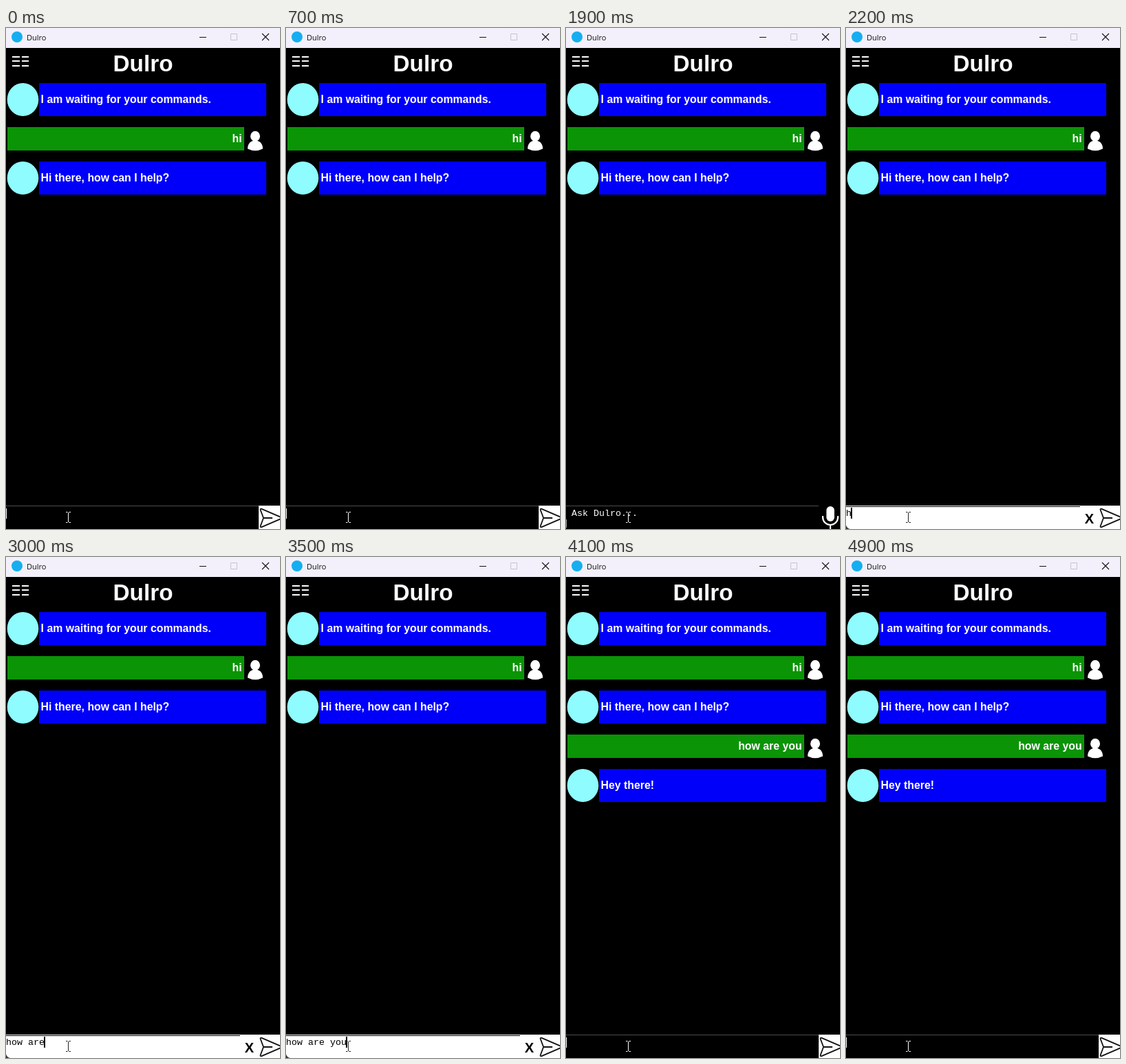
An HTML page with a canvas for the animation above (5 s loop, 398 by 728 pixels).

```html
<!DOCTYPE html>
<html lang="en">
<head>
<meta charset="utf-8">
<title>Dulro</title>
<style>
  html, body { margin: 0; width: 100%; height: 100%; overflow: hidden; background: #000; }
  canvas { display: block; width: 398px; height: 728px; }
</style>
</head>
<body>
<canvas id="stage" width="398" height="728"></canvas>
<script>
const ctx = document.getElementById('stage').getContext('2d');
const NAME = 'Dulro';
const LOOP = 5000, IDLE = 1500, TYPE = 2200, KEY = 125, SEND = 4100;
const QUERY = 'how are you';
const SANS = '"Liberation Sans", Arial, sans-serif';
const BOLD = `bold 15.85px ${SANS}`;
const MONO = '13.333px "Liberation Mono", "Courier New", monospace';

function rect(x, y, w, h, color) {
  ctx.fillStyle = color;
  ctx.fillRect(x, y, w, h);
}

function ellipse(x, y, rx, ry, color) {
  ctx.fillStyle = color;
  ctx.beginPath();
  ctx.ellipse(x, y, rx, ry, 0, 0, Math.PI * 2);
  ctx.fill();
}

function text(str, x, y, font, color, align = 'left') {
  ctx.font = font;
  ctx.fillStyle = color;
  ctx.textAlign = align;
  ctx.fillText(str, x, y);
}

function fill(d, color) {
  ctx.fillStyle = color;
  ctx.fill(new Path2D(d));
}

function stroke(d, color, width) {
  ctx.strokeStyle = color;
  ctx.lineWidth = width;
  ctx.stroke(new Path2D(d));
}

function titleBar() {
  rect(0, 0, 398, 29, '#f3f0fb');
  ellipse(16, 13, 8, 8, '#16aef0');
  text(NAME, 30, 18, '11px "Open Sans", "Noto Sans", sans-serif', '#111');
  stroke('M281 13.5H291', '#111', 1);
  stroke('M326.5 8.5H335.5V17.5H326.5Z', '#c6c3cc', 1);
  stroke('M372 8L382 18M382 8L372 18', '#111', 1.1);
}

function header() {
  for (const y of [42, 48, 55]) stroke(`M9 ${y}H20M23 ${y}H33`, '#fff', 2);
  text(NAME, 199, 63, `bold 33.333px ${SANS}`, '#fff', 'center');
}

function botMessage(str, y) {
  ellipse(24.5, y + 24, 22.8, 24, '#8ffcff');
  rect(48, y, 330, 48, '#0000fa');
  text(str, 50.6, y + 29, BOLD, '#fff');
}

function userMessage(str, y) {
  rect(2, y, 344, 34, '#0a9406');
  text(str, 342.6, y + 22, BOLD, '#fff', 'right');
  ellipse(362, y + 13.3, 7, 7.5, '#fff');
  fill(`M351 ${y + 31.5}C351 ${y + 25} 354 ${y + 21.5} 358.5 ${y + 20}H365.5
    C370 ${y + 21.5} 373 ${y + 25} 373 ${y + 31.5}Q362 ${y + 37} 351 ${y + 31.5}Z`, '#fff');
}

function sendButton() {
  rect(367, 694, 31, 34, '#fff');
  ctx.lineJoin = 'round';
  stroke(`M371.5 698.8L397 709.8Q401 712 397 714.2L371.5 725.2Q369 726 369.7 723.5
    L374 712L369.7 700.5Q369 698 371.5 698.8ZM374 712H387`, '#111', 1.8);
}

function micButton() {
  ctx.fillStyle = '#fff';
  ctx.beginPath();
  ctx.roundRect(378.3, 695, 11.5, 22, 5.7);
  ctx.fill();
  stroke('M373 709V711A11 11 0 0 0 395 711V709M384 722V728', '#fff', 2.2);
}

function pointer(color) {
  stroke('M87 703.5H89.5M91.5 703.5H94M90.5 704V718M87 718.5H89.5M91.5 718.5H94', color, 1);
}

function inputEmpty() {
  rect(0, 694, 367, 1, '#4c4c4c');
  rect(0, 698, 1, 15, '#fff');
  sendButton();
  pointer('#fff');
}

function inputHint() {
  rect(0, 694, 367, 1, '#4c4c4c');
  text(`Ask ${NAME}...`, 8, 709, MONO, '#fff');
  rect(0, 714, 1, 12, '#aaa');
  micButton();
  pointer('#fff');
}

function inputTyped(str) {
  rect(0, 694, 398, 34, '#fff');
  rect(0, 695, 340, 1, '#000');
  text(str, 0, 709, MONO, '#000');
  rect(str.length * 8 - 1, 697, 2, 16, '#000');
  text('X', 353.5, 720, `bold 20px ${SANS}`, '#000', 'center');
  sendButton();
  pointer('#222');
  fill('M0 722Q1 727 6 728H0Z', '#333');
}

function draw(t) {
  rect(0, 0, 398, 728, '#000');
  titleBar();
  header();
  botMessage('I am waiting for your commands.', 80);
  userMessage('hi', 144);
  botMessage('Hi there, how can I help?', 194);
  if (t >= SEND) {
    userMessage(QUERY, 258);
    botMessage('Hey there!', 308);
  }
  if (t < IDLE || t >= SEND) inputEmpty();
  else if (t < TYPE) inputHint();
  else inputTyped(QUERY.slice(0, 1 + Math.floor((t - TYPE) / KEY)));
}

const start = performance.now();
function tick() {
  draw((performance.now() - start) % LOOP);
  requestAnimationFrame(tick);
}
tick();
</script>
</body>
</html>
```
